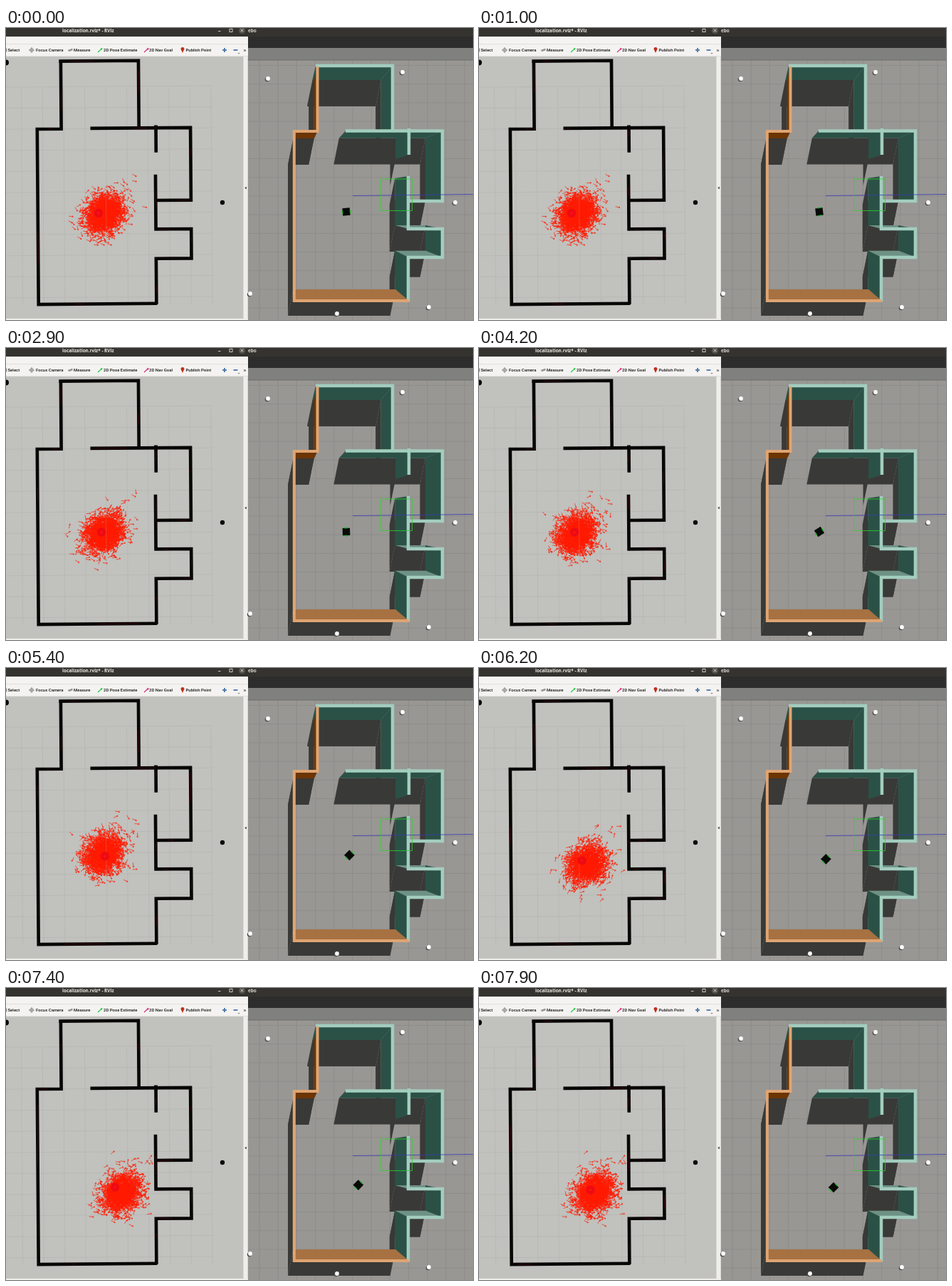
Write an HTML page with a canvas that moves like this. It is 656x410 px and loops after 8 s.

```html
<!DOCTYPE html>
<html lang="en">
<head>
<meta charset="utf-8">
<title>Robot localization</title>
<style>
html, body { margin: 0; width: 100%; height: 100%; overflow: hidden; background: #989794; }
canvas { display: block; }
</style>
</head>
<body>
<canvas id="stage" width="656" height="410"></canvas>
<script>
const W = 656, H = 410, LOOP = 8000;
const stage = document.getElementById('stage').getContext('2d');

// Wall tops as seen by the simulator camera; both views derive from these.
const mint = { top: '#a3cdbf', shaded: '#2b5146', lit: '#6d9185' };
const orange = { top: '#dfa573', shaded: '#6c3503', lit: '#a77141' };
const walls = [
  { paint: mint, width: 4.5, path: [[435, 53], [543, 53], [543, 144]] },
  { paint: mint, width: 4.5, path: [[477, 144.5], [613, 144.5], [613, 243], [565, 243]] },
  { paint: mint, width: 4.5, path: [[566, 141], [566, 178]] },
  { paint: mint, width: 4.5, path: [[565, 208], [565, 282], [613, 282], [613, 322], [565, 322], [565, 384]] },
  { paint: orange, width: 4, path: [[437.5, 54], [437.5, 145], [404.8, 145], [404.8, 383], [566, 383]] }
];
const segments = walls.flatMap(({ paint, path }) =>
  path.slice(1).map((end, i) => ({ paint, from: path[i], to: end })));

const camera = { x: 393, y: 236, depth: 0.109 };
const sun = { x: -7.5, y: 37 };
const METRE = { map: 29.6, world: 26.2 };

const toGround = ([x, y]) => [x - (x - camera.x) * camera.depth, y - (y - camera.y) * camera.depth];
const toShadow = ([x, y]) => [x + sun.x, y + sun.y];

// Wall-top coordinates to the slightly turned map.
const useMapSpace = g => g.setTransform(1.034, -0.008, 0.008, 1.034, -375.9, -4.7);

function layer(paint) {
  const canvas = document.createElement('canvas');
  canvas.width = W;
  canvas.height = H;
  paint(canvas.getContext('2d'));
  return canvas;
}

function trace(g, points) {
  g.beginPath();
  for (const [x, y] of points) g.lineTo(x, y);
}
function fill(g, color, points) {
  trace(g, points);
  g.fillStyle = color;
  g.fill();
}
function line(g, color, width, ...points) {
  trace(g, points);
  g.strokeStyle = color;
  g.lineWidth = width;
  g.stroke();
}
function rect(g, color, x, y, w, h) {
  g.fillStyle = color;
  g.fillRect(x, y, w, h);
}
function dot(g, color, x, y, r) {
  g.beginPath();
  g.arc(x, y, r, 0, 7);
  g.fillStyle = color;
  g.fill();
}
function text(g, str, x, y, color, font) {
  g.font = font;
  g.fillStyle = color;
  g.fillText(str, x, y);
}
function cross(g, color, width, x, y, r) {
  line(g, color, width, [x - r, y], [x + r, y]);
  line(g, color, width, [x, y - r], [x, y + r]);
}

function randomizer(seed) {
  return () => {
    seed = (seed * 1664525 + 1013904223) >>> 0;
    return seed / 4294967296;
  };
}

function robotPose(t) {
  const travel = Math.max(0, t - 4700) * 0.00625;
  const degrees = Math.max(-135, 265 - 0.092 * t);
  return { x: 478 + travel, y: 258 + travel * 1.1, angle: degrees * Math.PI / 180 };
}

function estimate(t) {
  const { x, y } = robotPose(t);
  const zoom = METRE.map / METRE.world;
  return { x: 134 + (x - 478) * zoom, y: 258.7 + (y - 258) * zoom };
}

function paintMap(g) {
  rect(g, '#c1c1bd', 0, 40, 333, 368);
  for (let i = -5; i <= 5; i++) {
    const x = 141 + i * METRE.map, y = 230 + i * METRE.map;
    line(g, '#b5b5b1', 0.7, [x - 1, 84], [x + 1, 388]);
    line(g, '#b5b5b1', 0.7, [0, y + 1], [291, y - 1]);
  }
  g.save();
  useMapSpace(g);
  for (const { path } of walls) line(g, '#090706', 4.5, ...path);
  g.restore();
  dot(g, '#080808', 0, 48.5, 4);
  dot(g, '#080808', 304, 245, 3.2);
}

const TITLE_FONT = 'bold 6.4px "Open Sans", "Noto Sans", sans-serif';
const LABEL_FONT = '500 6px Roboto, "Noto Sans", sans-serif';

function poseTool(g, color, x) {
  line(g, color, 1.1, [x, 34], [x + 6, 28.5]);
  fill(g, color, [[x + 6.5, 28], [x + 5.8, 31], [x + 3.6, 28.8]]);
}

function paintMapWindow(g) {
  rect(g, '#35332f', 0, 0, 340, 12);
  text(g, 'localization.rviz* - RViz', 79, 6.3, '#f0eee9', TITLE_FONT);
  line(g, '#d6d4ce', 0.9, [298, 4.5], [301.5, 4.5]);
  g.strokeRect(314, 1.5, 4, 4);
  dot(g, '#55534e', 331.5, 3.5, 4.6);
  line(g, '#f0eee9', 0.9, [329.7, 1.7], [333.3, 5.3]);
  line(g, '#f0eee9', 0.9, [333.3, 1.7], [329.7, 5.3]);

  rect(g, '#f4f3f1', 0, 12, 340, 28);
  rect(g, '#dcdad6', 0, 22.3, 340, 0.8);
  rect(g, '#d0cec9', 0, 39.5, 340, 1);
  const labels = { 'Select': 2.5, 'Focus Camera': 42, 'Measure': 95, '2D Pose Estimate': 137, '2D Nav Goal': 201, 'Publish Point': 252.5 };
  for (const [label, x] of Object.entries(labels)) text(g, label, x, 33.3, '#161616', LABEL_FONT);

  rect(g, '#8a8a8a', 0, 28.5, 1.2, 5);
  g.strokeStyle = '#777';
  g.lineWidth = 0.8;
  g.beginPath();
  g.arc(36, 31, 2.4, 0, 7);
  g.stroke();
  cross(g, '#777', 0.8, 36, 31, 4);
  line(g, '#99938a', 2.4, [87.5, 32], [93.5, 30]);
  poseTool(g, '#24c945', 129);
  poseTool(g, '#d32a78', 194);
  dot(g, '#c32a1d', 248, 29.3, 2.4);
  fill(g, '#c32a1d', [[245.8, 30], [250.2, 30], [248, 35]]);
  cross(g, '#4a76ae', 1.8, 307, 31, 3);
  line(g, '#4a76ae', 1.8, [319.5, 31], [325.5, 31]);
  fill(g, '#666', [[325.5, 35], [328.5, 35], [327, 36.6]]);
  text(g, '»', 333.5, 33.5, '#333', LABEL_FONT.replace('6px', '8px'));

  rect(g, '#dbd9d5', 333, 40, 7, 370);
  rect(g, '#efeeeb', 334, 40, 5, 370);
  rect(g, '#efeeeb', 0, 408, 340, 2);
  fill(g, '#444', [[337.8, 222.5], [337.8, 226.5], [335.3, 224.5]]);
}

function paintWalls(g) {
  for (const { from, to } of segments) {
    const a = toGround(from), b = toGround(to);
    fill(g, '#393937', [a, b, toShadow(b), toShadow(a)]);
  }
  for (const { paint, from, to } of segments) {
    const facesUp = from[1] === to[1] && from[1] > camera.y;
    fill(g, facesUp ? paint.lit : paint.shaded, [from, to, toGround(to), toGround(from)]);
  }
  for (const { paint, width, path } of walls) line(g, paint.top, width, ...path);
}

function paintWorld(g) {
  rect(g, '#989794', 340, 45, 316, 365);
  for (let i = -7; i <= 7; i++) {
    const x = 487 + i * METRE.world, y = 236 + i * METRE.world;
    if (x > 340) line(g, '#8a8986', 0.7, [x, 45], [x, H]);
    line(g, '#8a8986', 0.7, [340, y], [W, y]);
  }
  paintWalls(g);

  for (const [x, y] of [[368, 71], [557, 62], [631, 245], [343, 373], [594, 392], [465, 401]]) {
    dot(g, '#4c4c4a', x - 1.2, y + 1.2, 3);
    dot(g, '#fff', x, y, 2.9);
  }

  rect(g, '#35332f', 340, 0, 316, 12);
  text(g, 'ebo', 340, 6.3, '#d9d7d2', TITLE_FONT);
  rect(g, '#2d2d2d', 340, 12, 316, 16);
  rect(g, '#80807e', 340, 28, 316, 17);
  rect(g, '#6c6c6a', 340, 44.5, 316, 1);
}

function arrow(g, x, y, angle, length) {
  const tipX = x + Math.cos(angle) * length, tipY = y + Math.sin(angle) * length;
  g.moveTo(x, y);
  g.lineTo(tipX, tipY);
  for (const side of [-2.6, 2.6]) {
    g.moveTo(tipX, tipY);
    g.lineTo(tipX + Math.cos(angle + side) * 2, tipY + Math.sin(angle + side) * 2);
  }
}

// Gaussian pose guesses around where the robot is about to be.
function paintCloud(g, time, seed) {
  const random = randomizer(seed * 977 + 31);
  const normal = () => Math.sqrt(-2 * Math.log(1 - random())) * Math.cos(random() * 2 * Math.PI);
  const { x, y } = estimate(time + 900);
  const heading = (random() - 0.5) * 2;
  const place = (cx, cy, spreadX, spreadY, skew) => {
    const u = normal() * spreadX, v = normal() * spreadY - u * skew;
    const angle = heading + normal() * 0.7;
    arrow(g, cx + u - Math.cos(angle) * 3, cy + v - Math.sin(angle) * 3, angle, 6.5);
  };
  g.strokeStyle = '#ff1a00';
  g.lineWidth = 0.7;
  g.beginPath();
  for (let i = 0; i < 1600; i++) place(x + 3, y + 2, 13.5, 13.5, 0.2);
  for (let i = 0; i < 6; i++) place(x + 30, y - 46, 11, 6, 0);
  g.stroke();
  line(g, 'rgba(190,180,165,.35)', 0.7, [140.5, y - 30], [141, y + 30]);
}

const scene = layer(g => {
  paintMap(g);
  paintMapWindow(g);
  paintWorld(g);
});
const clouds = [0, 1500, 2800, 3500, 5800, 7300].map((time, i) =>
  ({ time, image: layer(g => paintCloud(g, time, i + 1)) }));

function paintScan(g, t) {
  const random = randomizer(Math.floor(t / 200) + 5);
  g.save();
  useMapSpace(g);
  for (const { from, to } of segments) {
    const start = random() * 0.6, end = start + random() * 0.4;
    const at = k => from.map((v, axis) => v + (to[axis] - v) * k);
    line(g, 'rgba(150,0,35,.35)', 0.9, at(start), at(end));
  }
  g.restore();
}

function paintRobot(g, { x, y, angle }) {
  g.save();
  g.translate(x, y);
  g.rotate(angle);
  rect(g, '#080a08', -5.2, -5.2, 10.4, 10.4);
  rect(g, '#16b52c', -2.5, -6.2, 4.6, 1.5);
  rect(g, '#16b52c', -2.5, 4.7, 4.6, 1.5);
  g.restore();
}

function draw(t) {
  const g = stage;
  g.drawImage(scene, 0, 0);
  paintScan(g, t);
  g.drawImage(clouds.filter(c => c.time <= t).pop().image, 0, 0);
  const { x, y } = estimate(t);
  const drift = t < clouds[1].time ? 4 : 0;
  dot(g, '#ee0a14', x - drift, y + drift / 3, 6.2);
  dot(g, '#f8140c', x - drift, y + drift / 3, 2);

  paintRobot(g, robotPose(t));
  line(g, '#3939b5', 0.8, [487, 235.5], [656, 233.5]);
  g.strokeStyle = '#2bd42b';
  g.lineWidth = 0.8;
  g.strokeRect(526.5, 212, 44, 44.5);
}

function tick(now) {
  draw(Math.floor((now % LOOP) / 100) * 100);
  requestAnimationFrame(tick);
}
draw(0);
requestAnimationFrame(tick);
</script>
</body>
</html>
```
